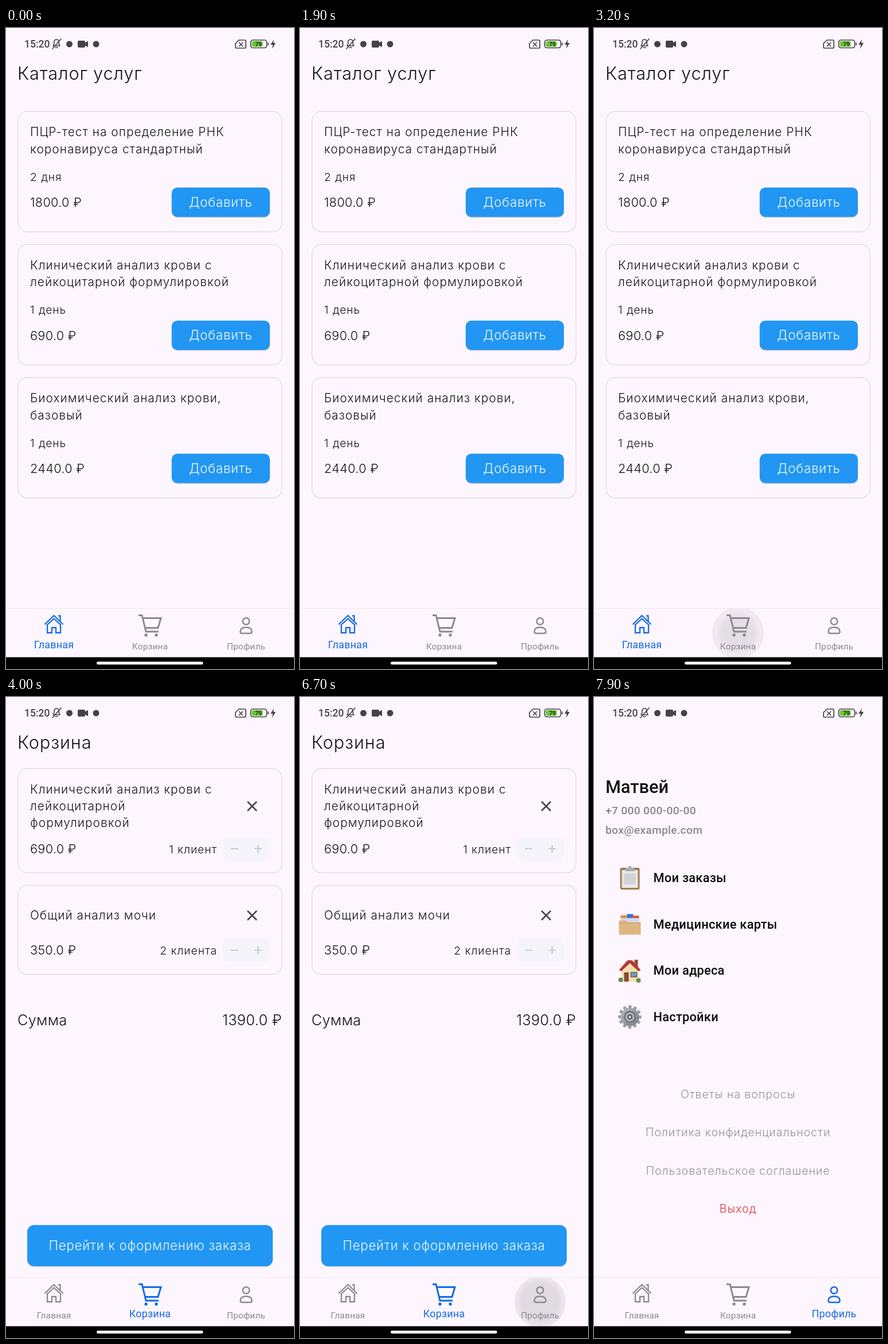
Recreate the animation shown at these times as an HTML page. Size 502x1115 px, loop 8 s.

```html
<!DOCTYPE html>
<html lang="ru">
<head>
<meta charset="utf-8">
<style>
html, body { margin: 0; width: 100%; height: 100%; overflow: hidden; background: #fef6ff; }
svg { display: block; width: 502px; height: 1115px; }
text { font-family: Inter, sans-serif; font-weight: 350; fill: #161418; white-space: pre; }
.head { font-size: 30.7px; letter-spacing: .9px; }
.title { font-size: 20.8px; letter-spacing: 1.05px; }
.small { font-size: 19.3px; letter-spacing: .95px; }
.price { font-size: 21.7px; letter-spacing: .3px; }
.sum { font-size: 25.3px; letter-spacing: .3px; }
.button { font-size: 22.3px; letter-spacing: .7px; fill: #f4f9ff; }
.link { font-size: 19.7px; letter-spacing: .9px; fill: #959199; }
.name, .contact, .menu { font-family: Roboto, sans-serif; font-weight: 500; }
.name { font-size: 30.7px; }
.contact { font-size: 19.2px; letter-spacing: .32px; fill: #8a878d; }
.menu { font-size: 21.7px; letter-spacing: .3px; fill: #0c0b0d; }
.nav text { font-family: Roboto, sans-serif; font-weight: 400; letter-spacing: .2px; fill: inherit; }
.nav path, .nav circle { fill: none; stroke-width: 3; }
.mid { text-anchor: middle; }
.end { text-anchor: end; }
.card { fill: none; stroke: #e1dce5; stroke-width: 1.4; }
</style>
</head>
<body>
<svg id="stage" viewBox="0 0 502 1115">
  <defs>
    <clipPath id="bar"><path d="M0 1010H502V1094H0z"/></clipPath>
    <clipPath id="cta"><rect x="37" y="918.5" width="428" height="71.5" rx="12"/></clipPath>
    <radialGradient id="glow"><stop offset=".7" stop-color="#000"/><stop offset="1" stop-color="#000" stop-opacity="0"/></radialGradient>
    <radialGradient id="spark"><stop offset=".3" stop-color="#fff"/><stop offset="1" stop-color="#fff" stop-opacity="0"/></radialGradient>
    <linearGradient id="metal" x2="1" y2="1"><stop stop-color="#b9bec5"/><stop offset="1" stop-color="#737a83"/></linearGradient>
  </defs>
  <path fill="#fef6ff" d="M0 0H502V1115H0z"/>
  <g id="status" fill="none" stroke="#444247" stroke-width="1.7" stroke-linejoin="round" stroke-linecap="round">
    <text x="32" y="34" stroke="none" style="font:500 17.5px Roboto,sans-serif;fill:#444247">15:20</text>
    <path d="M82 31h12q-2-2-2-7q0-4-4-4t-4 4q0 5-2 7M86 34h4M81 36L96 19"/>
    <g fill="#444247" stroke="none">
      <circle cx="110.5" cy="28" r="5.5"/><circle cx="157" cy="28" r="5.5"/>
      <path d="M127 22h9q2 0 2 2v1.500l5-3v11l-5-3v1.500q0 2-2 2h-9q-2 0-2-2v-8q0-2 2-2zM467 20l-6 9h4l-1 7l6-10h-4z"/>
    </g>
    <path d="M406 21h10q2 0 2 2v10q0 2-2 2h-14q-2 0-2-2v-6zM406.500 25.500l6 6m0-6l-6 6"/>
    <rect x="426.500" y="21" width="28" height="13.500" rx="4"/>
    <rect x="428.500" y="23" width="19" height="9.500" rx="2" fill="#67c82e" stroke="none"/>
    <path d="M457 26v3.500"/>
    <text x="440" y="31.500" class="mid" stroke="none" style="font:700 10px Roboto,sans-serif;fill:#263522">79</text>
  </g>
  <g id="catalog"></g>
  <g id="basket"></g>
  <g id="profile"></g>
  <path d="M0 1009.500H502" stroke="#f0e9f2" stroke-width="1.500"/>
  <g id="ripples" clip-path="url(#bar)"></g>
  <g id="nav"></g>
  <path fill="#000" d="M0 1094.500H502V1115H0z"/>
  <rect x="158" y="1102.200" width="185.500" height="5" rx="2.500" fill="#fff"/>
</svg>
<script>
const $ = id => document.getElementById(id);
const label = (cls, x, y, str) => `<text class="${cls}" x="${x}" y="${y}">${str}</text>`;
const card = (y, h) => `<rect class="card" x="21" y="${y}" width="460" height="${h}" rx="16"/>`;
const button = (x, y, w, h, r, str) => {
  const box = (dy, style) => `<rect x="${x}" y="${y + dy}" width="${w}" height="${h}" rx="${r}" ${style}/>`;
  return box(1.4, 'fill="#75839a" opacity=".4"') + box(0, 'fill="#2196f3"') +
    label('button mid', x + w / 2, y + h / 2 + 8, str);
};

function service(i, [first, second, days, price]) {
  const y = 145 + i * 231.5;
  return card(y, 209.5) + label('title', 42, y + 43, first) + label('title', 42, y + 72.5, second) +
    label('small', 42, y + 120.5, days) + label('price', 42, y + 166, price) +
    button(288.8, y + 132.4, 171.2, 51.1, 10, 'Добавить');
}

function basketItem(y, h, lines, textY, crossY, price, count) {
  const base = y + h - 34.5, mid = base - 7.5;
  return card(y, h) + lines.map((s, i) => label('title', 42, textY + i * 29.3, s)).join('') +
    label('price', 42, base, price) + label('small end', 368, base, count) +
    `<path d="M421 ${crossY - 8}l16 16m0-16l-16 16" stroke="#47434b" stroke-width="2.6"/>
     <rect x="378" y="${mid - 20.5}" width="82" height="41" rx="10" fill="#f5f4fa"/>
     <path d="M392 ${mid}h13m28 0h13m-6.5-6.500v13" stroke="#b7c0ca" stroke-width="1.7"/>`;
}

$('catalog').innerHTML = label('head', 20, 90, 'Каталог услуг') + [
  ['ПЦР-тест на определение РНК', 'коронавируса стандартный', '2 дня', '1800.0 ₽'],
  ['Клинический анализ крови с', 'лейкоцитарной формулировкой', '1 день', '690.0 ₽'],
  ['Биохимический анализ крови,', 'базовый', '1 день', '2440.0 ₽']
].map((s, i) => service(i, s)).join('');

$('basket').innerHTML = label('head', 20, 90, 'Корзина') +
  basketItem(124.5, 181.5, ['Клинический анализ крови с', 'лейкоцитарной', 'формулировкой'], 167.5, 190, '690.0 ₽', '1 клиент') +
  basketItem(327.5, 155, ['Общий анализ мочи'], 387, 380, '350.0 ₽', '2 клиента') +
  label('sum', 20, 571, 'Сумма') + label('sum end', 481, 571, '1390.0 ₽') +
  button(37, 918.5, 428, 71.5, 12, 'Перейти к оформлению заказа') +
  `<g id="press" clip-path="url(#cta)"><path d="M37 918H465V990H37z" fill="#fff" opacity=".05"/>
   <circle id="pressSpot" cx="404" cy="964" fill="url(#spark)" opacity=".09"/></g>`;

const teeth = Array.from({length: 12}, (_, i) =>
  `<rect x="-2.800" y="-20.500" width="5.600" height="8" rx="1.500" transform="rotate(${i * 30})"/>`).join('');
const pictures = [
  `<rect x="-17" y="-18" width="34" height="38" rx="3" fill="#a27c50"/><path d="M-14-14h28v31h-28z" fill="#e6e6e8"/>
   <path d="M-10-8h20v19h-20z" fill="#d3d3d6"/><path d="M-8-12v-4q0-2 2-2h3q0-3 3-3t3 3h3q2 0 2 2v4z" fill="#a9acb1"/>`,
  `<path d="M-16-16h11v9h-11z" fill="#ee8a38"/><path d="M-5-18h11v10h-11z" fill="#3f73cf"/><path d="M4-15h12v9h-12z" fill="#e0483e"/>
   <path d="M-17-11h34v8h-34z" fill="#cfdcec"/><path d="M-19-7h12l3 3h23v22h-38z" fill="#dfb583"/><path d="M-19-2h38" stroke="#cfa16e"/>`,
  `<path d="M8-19h6v13h-6z" fill="#9c4a3c"/><path d="M-14-3L0-17L15-3V19h-29z" fill="#f2dcb4"/>
   <path d="M-19-1L-4-18H4L19-1L15 1L0-13L-15 1z" fill="#b23a2f"/><path d="M-10 3h8v16h-8z" fill="#8b4a2f"/>
   <path d="M2 3h10v8h-10z" fill="#5d9fd0" stroke="#8b5a3b" stroke-width="1.500"/>
   <circle cx="-16" cy="16" r="4" fill="#5d9447"/><circle cx="15" cy="17" r="4" fill="#5d9447"/>`,
  `<g fill="url(#metal)">${teeth}<circle r="16"/></g><circle r="10.500" fill="#6c737b"/><circle r="8" fill="#adb2b8"/>
   <circle r="4.500" fill="#59616a"/><circle r="2" fill="#e6e7ea"/>`
];
$('profile').innerHTML = label('name', 20, 167, 'Матвей') + label('contact', 20, 204, '+7 000 000-00-00') +
  label('contact', 20, 237.5, 'box@example.com') +
  ['Мои заказы', 'Медицинские карты', 'Мои адреса', 'Настройки'].map((s, i) => {
    const y = 322 + i * 80.5;
    return `<g transform="translate(62.500 ${y - 7})">${pictures[i]}</g>` + label('menu', 103.5, y, s);
  }).join('') +
  ['Ответы на вопросы', 'Политика конфиденциальности', 'Пользовательское соглашение', 'Выход'].map((s, i) =>
    `<text class="link mid" x="251" y="${698 + i * 66.4}" ${i == 3 ? 'style="fill:#dc3b3b"' : ''}>${s}</text>`).join('');

const tabs = [
  [83.5, 'Главная', '<path d="M67.500 1037.500L83.500 1022L99.500 1037.500M94.500 1032V1022.500H91M72 1037V1052H80V1043H87V1052H95V1037M72 1038L83.500 1027.500L95 1038" style="stroke-width:2.300"/>'],
  [251, 'Корзина', '<path d="M231 1021.500h6l7 28.500h22M239 1026.500h31l-5 17h-23"/><circle cx="244" cy="1056" r="1.200"/><circle cx="262" cy="1056" r="1.200"/>'],
  [418.5, 'Профиль', '<circle cx="418.500" cy="1032" r="5.800" style="stroke-width:2.500"/><path d="M408.500 1050q0-7.500 10-7.500t10 7.500q0 3-3 3h-14q-3 0-3-3z" style="stroke-width:2.500"/>']
];
$('nav').innerHTML = tabs.map(([x, str, icon]) => `<g class="nav">${icon}${label('mid', x, 1080, str)}</g>`).join('');
$('ripples').innerHTML = tabs.slice(1).map(([x]) =>
  `<g><circle cx="${x}" cy="1052" r="45"/><circle cx="${x}" cy="1052" fill="url(#glow)"/></g>`).join('');
const tabNodes = [...$('nav').children], rippleNodes = [...$('ripples').children];

const LOOP = 8000, TO_BASKET = 3300, TO_PROFILE = 6750;
const ramp = (t, from, length) => Math.min(1, Math.max(0, (t - from) / length));
const ease = x => x * x * (3 - 2 * x);
const mix = (a, b, k) => a + (b - a) * k;

function drawRipple(node, t, start, release) {
  const [halo, splash] = node.children, grow = ease(ramp(t, start + 100, 150));
  node.setAttribute('opacity', 1 - ramp(t, release, 400));
  halo.setAttribute('opacity', .055 * ramp(t, start, 200));
  splash.setAttribute('opacity', .065 * grow);
  splash.setAttribute('r', mix(18, 45, grow));
}

function draw(t) {
  const page = t < TO_BASKET ? 0 : t < TO_PROFILE ? 1 : 2;
  ['catalog', 'basket', 'profile'].forEach((id, i) => $(id).style.display = i == page ? '' : 'none');

  const first = ease(ramp(t, TO_BASKET, 200)), second = ease(ramp(t, TO_PROFILE, 200));
  [1 - first, first - second, second].forEach((on, i) => {
    const [r, g, b] = [mix(140, 18, on), mix(137, 107, on), mix(144, 229, on)].map(Math.round);
    const node = tabNodes[i], color = `rgb(${r},${g},${b})`, text = node.lastElementChild;
    node.style.fill = node.style.stroke = color;
    text.style.stroke = 'none';
    text.style.fontSize = mix(15.4, 17.9, on) + 'px';
    text.setAttribute('y', mix(1080.5, 1079, on));
  });

  drawRipple(rippleNodes[0], t, 3000, TO_BASKET);
  drawRipple(rippleNodes[1], t, 6450, TO_PROFILE);
  $('press').setAttribute('opacity', ramp(t, 5700, 150) * (1 - ramp(t, 5950, 350)));
  $('pressSpot').setAttribute('r', mix(15, 50, ramp(t, 5700, 500)));
}

function tick(now) {
  draw(now % LOOP);
  requestAnimationFrame(tick);
}
draw(0);
requestAnimationFrame(tick);
</script>
</body>
</html>
```
